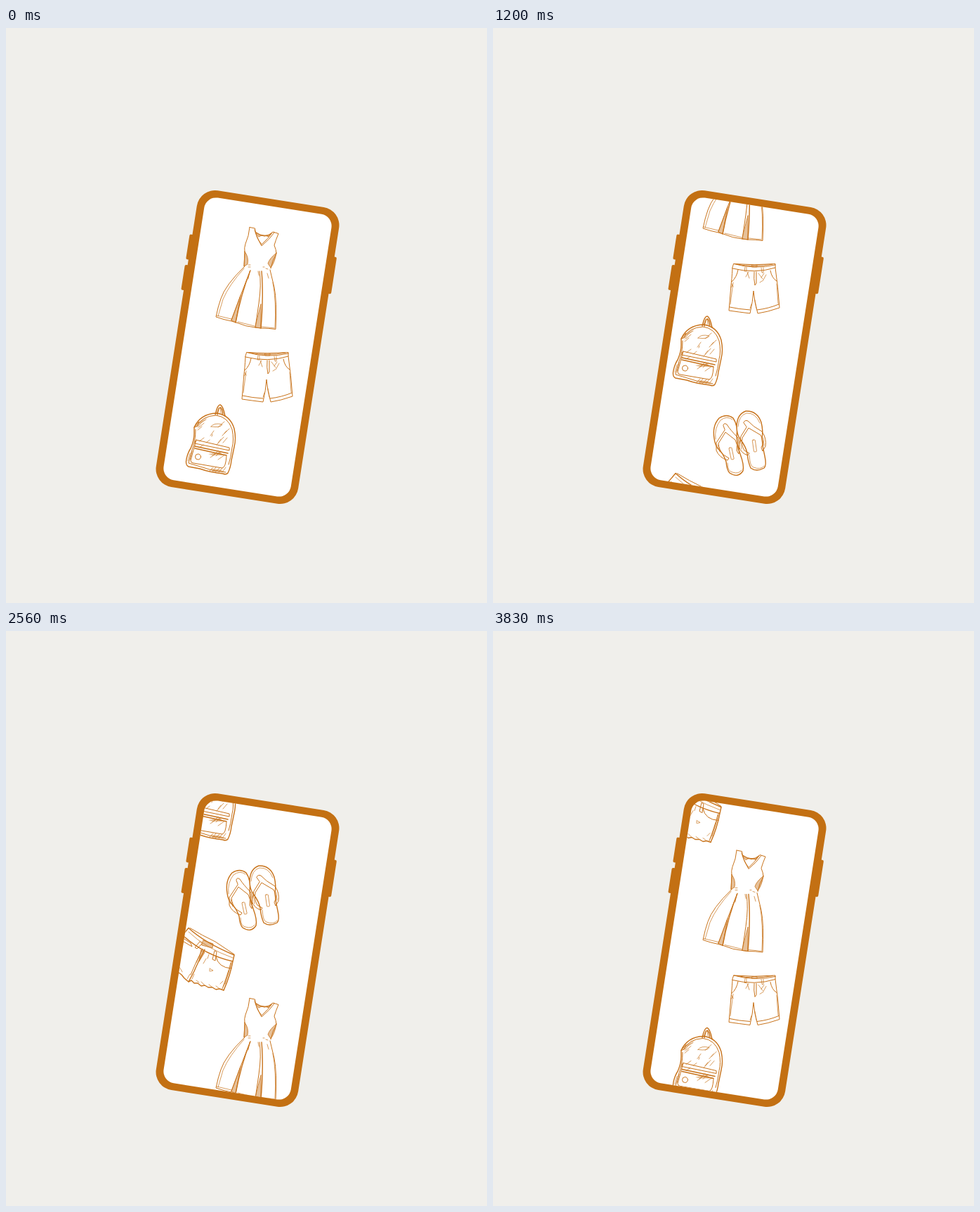
Write an HTML page that moves like this. It is 685 by 818 pixels and loops after 4.13 s.

```html
<!DOCTYPE html>
<html lang="en">
<head>
<meta charset="utf-8">
<title>Clothes feed on a phone</title>
<style>
  html, body { margin: 0; width: 100%; height: 100%; overflow: hidden; background: #f0efeb; }
  svg { display: block; }
  #items { fill: none; stroke: #c8731b; stroke-width: 1; stroke-linecap: round; stroke-linejoin: round; }
  .thin { stroke-width: .7; }
  .bold { stroke-width: 1.4; }
  .hatch { fill: url(#hatch); stroke-width: .8; }
</style>
</head>
<body>
<svg width="685" height="818" viewBox="0 0 685 818">
  <defs>
    <clipPath id="screen">
      <rect x="-91.7" y="-203.3" width="183.4" height="406.6" rx="17" transform="translate(344 454) rotate(8.9)"/>
    </clipPath>
    <pattern id="hatch" width="2" height="2" patternUnits="userSpaceOnUse" patternTransform="rotate(-35)">
      <path d="M0 1H3" stroke="#c8731b" stroke-width=".9"/>
    </pattern>

    <g id="items">
      <g id="dress">
        <path d="M347 283.500L354.500 285Q355 292 357 296Q360 303 364 308Q373 300 380 290L388 292.500
          Q384 302 382 309Q385 316 385 321Q379 331 377 342M347 283.500Q346 296 341 307Q339 312 340 320
          L339 339M354 287Q357 299 364 310Q376 300 382 291M355 290Q369 302 379 291"/>
        <path class="hatch" d="M340 318L339 339L344 336Q346 326 340 318ZM385 320Q383 333 377 341
          L373 335Q375 328 385 320ZM356 291Q369 299 378 292L374 297Q366 293 360 297Z"/>
        <path d="M340 339Q312 366 306 385Q302 396 299 411Q310 415 321 417L328 419Q342 425 355 426L363 427
          Q374 427 384 428.500Q386 389 382 369L376 344"/>
        <path class="thin" d="M339 342Q318 365 309 386L302 410M380 362Q385 388 383 426M300 409L321 414M330 418L354 424
          M364 425L383 427M345 337H348M345 340H348M366 340H368M370 342L373 343M347 346L345 357M359 346L360 352M372 349L374 356"/>
        <path class="bold" d="M348 345Q335 377 327 419M364 346Q367 380 363 427"/>
        <path d="M346 350Q333 382 321 416M361 346Q364 365 360 392L355 426"/>
        <path class="hatch" d="M334 381L327 419L321 416ZM363 393L363 427L355 426Z"/>
      </g>

      <g id="shorts">
        <path d="M343 461.500Q372 464 402 461.500L402 467Q373 476 341 468ZM343 461.500Q372 470 402 463M347 462Q372 467 398 462"/>
        <path d="M341 468Q340 485 339 492L336 528Q350 530 366 532Q370 515 371 500Q372 515 377 532Q391 530 408 524
          Q406 494 402 467M337 523Q350 526 366 527M376 527Q393 525 407 519"/>
        <path d="M349 470Q347 481 340 487M395 471Q397 482 404 486M372 473Q371 483 373 492L375 489V473"/>
        <path class="thin" d="M359 466L358 472L361 472V466M382 467L383 474L385 474V467M369 463H376V466H369Z
          M364 473L360 480M362 473L365 482M378 475L384 483M386 475L382 481M389 477L384 486M342 488L338 519
          M340 490L342 494M339 495L341 492M404 490L406 518M368 519L366 525M373 513L375 525M383 486L380 488"/>
      </g>

      <g id="backpack">
        <path class="bold" d="M298 550Q301 536 305 536Q309 537 312 552M301 550Q303 540 305 540Q308 541 308 550"/>
        <path class="bold" d="M268 568Q277 549 299 548Q319 550 325 570Q328 584 325 596Q323 606 321 615
          Q320 625 316 633Q314 636 309 634Q290 632 276 627L260 624Q255 622 257 613Q259 604 263 598Q268 587 268 577Z"/>
        <path d="M271 567Q279 552 299 551Q316 553 322 571Q325 586 322 597Q320 612 317 621M270 571Q270 588 265 600
          L260 619Q277 624 293 629L313 632M268 568L275 560L273 566ZM271 586L318 597V601L269 591Z
          M271 586L263 615Q263 619 267 619L308 626Q313 625 314 609"/>
        <path class="bold" d="M269 595L316 605M269 598L314 608"/>
        <path class="thin" d="M292 567Q296 561 308 564Q306 569 292 567Z"/>
        <circle cx="273.500" cy="610" r="4"/>
        <path class="thin" d="M277 562L285 557M275 568L282 562M273 572L279 567M311 560L302 568M318 570L311 577
          M314 573L308 580M310 582L300 593M315 583L309 590M306 585L302 590M296 573L291 580M294 578L293 581
          M282 583L275 588M290 586L285 590M281 593L275 597M302 601L294 609M306 602L299 609M312 607L302 614
          M298 606L291 611M295 625L290 630M299 625L294 631M304 626L298 632M308 626L303 632M313 625L308 632
          M262 605L259 616M265 602L262 614M303 540L300 548M306 539L305 549M308 540L310 550"/>
        <path class="hatch" stroke="none" d="M288 606L305 603L309 608L294 608ZM291 627L305 628L311 632L296 631Z
          M276 560L287 554L279 561L272 571Z"/>
      </g>

      <g id="sandals" transform="translate(0 410)">
        <path class="bold" d="M315 300Q312 282 322 271Q333 264 342 271Q349 281 347 297Q348 311 352 322
          Q358 338 356 346Q349 357 337 349Q333 345 332 333Q328 321 320 314Q316 308 315 300Z
          M347 282Q348 265 360 261Q376 260 382 277Q385 289 383 300Q384 313 387 325Q390 338 386 342
          Q375 348 367 342Q363 333 362 321Q360 311 352 301Q347 294 347 282Z"/>
        <path d="M328 281Q329 277 333 280Q338 288 349 299Q352 310 350 322L347 317Q349 309 345 302L331 291
          L321 307Q322 317 328 323L336 328L334 331Q322 327 318 317V306L330 288Z
          M357 277Q359 273 363 275Q370 283 383 290Q390 300 388 311L384 318L382 313Q387 305 381 295L364 285
          L355 299Q353 309 358 317L365 321L363 324Q353 321 350 311L353 297L361 284Z"/>
        <path class="thin" d="M317 301Q315 285 324 274Q333 267 341 273M334 335Q334 347 341 348Q350 351 354 345
          M349 283Q350 267 361 264Q374 263 380 278M365 324Q366 340 371 341Q381 345 386 339
          M320 309L323 319M348 305L349 317M352 301L354 315M385 299L386 310"/>
        <rect x="337.500" y="313" width="4" height="17" rx="1" class="thin" transform="rotate(-12 339 321)"/>
        <rect x="370.500" y="302" width="4" height="17" rx="1" class="thin" transform="rotate(-8 372 311)"/>
      </g>

      <g id="denim" transform="translate(0 208)">
        <path class="bold" d="M260 551.500Q282 572 325 590L323 599Q284 590 254 564M260 551.500Q252 561 244 570L224 594
          M323 599Q319 620 310 640M283 582Q273 601 268 613L260 628"/>
        <path d="M262 551.500Q279 562 298 571L325 589M280 581Q270 601 263 618M299 592Q302 608 321 609M321 600Q316 622 308 638"/>
        <path class="bold" d="M224 594L229 601L233 603L238 608L242 610L246 615L250 618L254 623L260 628
          L264 626L268 630L273 630L278 634L283 633L288 636L294 636L299 639L304 638L310 640"/>
        <path d="M297 584L294 596L298 598L300 586ZM276 571L269 579L272 581L279 574ZM248 568L265 578L263 573L251 565"/>
        <path class="hatch" d="M281 569L295 574L294 580L279 576ZM278 583L283 586L275 599Z"/>
        <path class="thin" d="M260 557Q284 580 323 594M320 601L312 631M317 612L309 635M243 583L233 596M247 580L242 586
          M237 594L241 599M238 599L242 595M290 609L295 612L291 613M290 610V613M276 591L271 601M285 595L281 602
          M289 589L287 595M262 617L258 624M268 617L265 624M305 631L309 627M247 607L251 614M278 628L282 632
          M271 626L275 629M289 632L293 635M299 634L303 637M236 603L240 606"/>
      </g>
    </g>
  </defs>

  <rect width="685" height="818" fill="#f0efeb"/>
  <g transform="translate(344 454) rotate(8.9)" fill="#c37013">
    <rect x="-106.200" y="-146" width="12" height="36" rx="2"/>
    <rect x="-106.200" y="-102" width="12" height="36" rx="2"/>
    <rect x="94" y="-146" width="11.800" height="53" rx="2"/>
    <rect x="-102.400" y="-213.500" width="204.800" height="427" rx="26"/>
    <rect x="-91.700" y="-203.300" width="183.400" height="406.600" rx="17" fill="#fff"/>
  </g>
  <g clip-path="url(#screen)">
    <g id="feed">
      <use href="#items"/>
      <use href="#items" y="576"/>
    </g>
  </g>
</svg>
<script>
  const LOOP = 4130;
  // [start time in ms, scroll distance in px]
  const steps = [
    [0, 0], [330, 30], [600, 64], [870, 98], [1200, 126], [1500, 167], [1800, 208], [2130, 263],
    [2330, 299], [2560, 337], [2860, 366], [3130, 410], [3300, 456], [3530, 502], [3830, 547.5]
  ];
  const feed = document.getElementById('feed');

  function draw() {
    const time = performance.now() % LOOP;
    const [, scroll] = steps.findLast(([start]) => start <= time);
    feed.setAttribute('transform', `translate(0 ${-scroll})`);
    requestAnimationFrame(draw);
  }
  draw();
</script>
</body>
</html>
```
